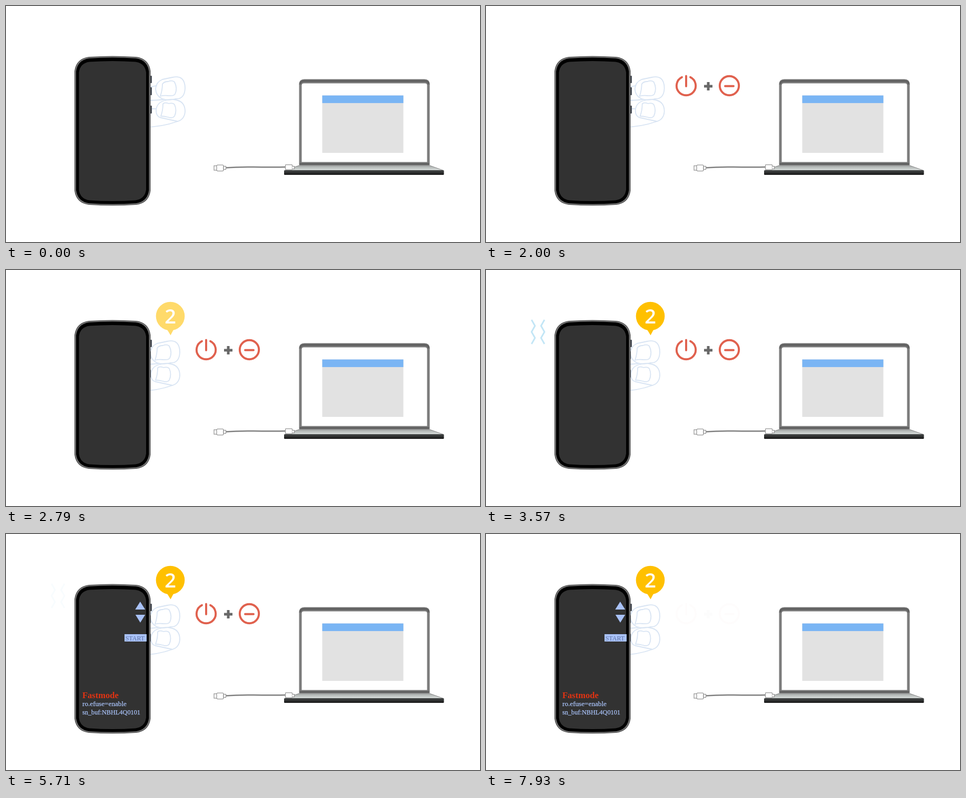
These frames come from a looping animation (900x450 px, 8000 ms). An HTML page:

```html
<!DOCTYPE html>
<html lang="en">
<head>
<meta charset="utf-8">
<title>Key combination with laptop</title>
<style>
  html, body { margin: 0; height: 100%; overflow: hidden; background: #fff; }
  svg { display: block; width: 900px; height: 450px; fill: none; }
  .serif { font-family: "Liberation Serif", serif; fill: #a9c2f8; }
  .body { stroke: #a9c2f8; stroke-width: 0.25; }
</style>
</head>
<body>
<svg viewBox="0 0 900 450">
  <defs>
    <linearGradient id="deck" x2="0" y2="1">
      <stop stop-color="#a4a8a7"/><stop offset="1" stop-color="#dbe0de"/>
    </linearGradient>
    <linearGradient id="base" x2="0" y2="1">
      <stop stop-color="#474a4a"/><stop offset="1" stop-color="#151515"/>
    </linearGradient>
  </defs>

  <g id="hand" stroke="#d8e4f3" stroke-width="1.8" stroke-linecap="round" stroke-linejoin="round">
    <path d="M262 160Q276 153 286 152M262 180Q290 180 300 178M262 196H285M262 231Q295 231 326 220"/>
    <path d="M284 158Q285 145 297 140L316 136Q340 131 340 157Q339 178 322 177Q308 181 297 177Q285 172 284 158Z"/>
    <path d="M297 149Q300 144 308 144Q316 141 320 145Q326 157 321 168Q318 172 308 171Q300 170 293 172Q297 160 297 149Z"/>
    <path d="M285 199Q286 184 302 180Q312 177 322 179Q340 182 340 201Q339 216 326 220L294 213Q285 211 285 199Z"/>
    <path d="M298 187Q300 183 309 186Q317 184 320 188Q325 199 320 210Q316 215 308 212Q300 210 294 210Q298 199 298 187Z"/>
  </g>

  <g fill="#4b5059">
    <rect x="272" y="133" width="5" height="14" rx="1"/>
    <g id="keys">
      <rect x="272" y="155" width="5" height="15" rx="1"/>
      <rect x="272" y="190" width="5" height="15" rx="1"/>
    </g>
  </g>
  <g id="phone"></g>

  <g id="menu" class="serif">
    <path d="M254.8 129L264.3 144H245.3ZM245.8 154H264.3L255 169Z"/>
    <rect x="225" y="191" width="42" height="14"/>
    <text x="226.7" y="202.7" font-size="12" style="fill:#5f74a8">START</text>
    <text x="145" y="313" font-size="16.5" font-weight="bold" style="fill:#e23312">Fastmode</text>
    <text class="body" x="145" y="328" font-size="13.2">ro.efuse=enable</text>
    <text class="body" x="145" y="344" font-size="12.3">sn_buf:NBHL4Q0101</text>
  </g>

  <path id="buzz" stroke="#2ba6de" stroke-width="3" stroke-linejoin="round"/>

  <g id="balloon">
    <path d="M305 112H319L312.5 124.5Z" fill="#ffc000"/>
    <circle cx="312" cy="88" r="27.3" fill="#ffc000"/>
    <text x="312" y="101.500" font-size="38" font-weight="600" text-anchor="middle" fill="#fff" font-family="Open Sans, sans-serif">2</text>
  </g>

  <g id="combo" stroke="#e0614e" stroke-width="3.9" stroke-linecap="round">
    <path d="M372 135.700A18.200 18.200 0 1 0 388 135.700M380 133.500V153"/>
    <circle cx="462" cy="152" r="18.200"/>
    <path d="M454 152.700H470"/>
    <path d="M414 153H430M422 145V161" stroke="#686868" stroke-width="5" stroke-linecap="butt"/>
  </g>

  <g transform="translate(.5 .6)">
    <path d="M556 303V149Q556 139 566 139H794Q804 139 804 149V303Z" fill="#7c7c7c"/>
    <path d="M558 149Q558 142.500 566 142.500H794Q802 142.500 802 149" stroke="#626262" stroke-width="4"/>
    <path d="M561 297V151Q561 147 565 147H795Q799 147 799 151V297Z" fill="#fff"/>
    <path d="M557 301H803" stroke="#606060" stroke-width="4"/>
    <path d="M556 303.500H804L830 313H529Z" fill="url(#deck)" stroke="#8a8a8a"/>
    <rect x="527.500" y="312.500" width="303.500" height="9" rx="1.500" fill="url(#base)"/>
    <rect x="600" y="170" width="154" height="109.500" fill="#e2e2e2"/>
    <rect x="600" y="170" width="154" height="14.500" fill="#7ab5f4"/>

    <path d="M416 308Q440 306 470 306.500T531 306.500" stroke="#808080" stroke-width="2.500"/>
    <g fill="#fff" stroke="#999" stroke-width="1.300">
      <rect x="394.500" y="304" width="6" height="8.500"/>
      <rect x="399.500" y="302.500" width="13" height="11.500" rx="2"/>
      <rect x="412.500" y="305" width="4.500" height="6"/>
      <rect x="530" y="302" width="13" height="9.500" rx="1"/>
      <path d="M543 305H547V310H543"/>
    </g>
  </g>
</svg>
<script>
const LOOP = 8000;
const el = id => document.getElementById(id);
const ramp = (t, from, to) => Math.min(1, Math.max(0, (t - from) / (to - from)));
const fade = (id, value) => el(id).setAttribute("opacity", value);
const shift = (id, x) => el(id).setAttribute("transform", `translate(${x} 0)`);

// Rounded slab whose top and bottom edges bulge slightly.
function slab(x1, y1, x2, y2, r, fill) {
  const mid = (x1 + x2) / 2, k = r * 0.12;
  return `<path fill="${fill}" d="M${x1} ${y1 + r}Q${x1 + k} ${y1 + k} ${x1 + r} ${y1}
    Q${mid} ${y1 - 3} ${x2 - r} ${y1}Q${x2 - k} ${y1 + k} ${x2} ${y1 + r}
    V${y2 - r}Q${x2 - k} ${y2 - k} ${x2 - r} ${y2}
    Q${mid} ${y2 + 3} ${x1 + r} ${y2}Q${x1 + k} ${y2 - k} ${x1} ${y2 - r}Z"/>`;
}
el("phone").innerHTML =
  slab(130, 97, 274.5, 379, 27, "#4a4a4a") +
  slab(131.2, 98.2, 273.3, 377.8, 26, "#7c7c7c") +
  slab(133, 99.7, 271.5, 376.3, 25, "#000") +
  slab(138.5, 106.5, 266, 370.5, 20, "#323232");

const zigzag = (a, b) =>
  "M" + Array.from({ length: 5 }, (_, i) => `${i % 2 ? b : a} ${95 + i * 11.5}`).join("L");
el("buzz").setAttribute("d", zigzag(86.5, 93) + zigzag(111, 104.5));

function draw(now) {
  const t = now % LOOP;
  fade("combo", ramp(t, 200, 1750) - ramp(t, 6350, 7950));
  shift("hand", -10 * ramp(t, 1900, 2640));
  shift("keys", -2 * ramp(t, 2250, 2600));
  fade("balloon", ramp(t, 2600, 2930));
  fade("buzz", ramp(t, 3260, 4360) - ramp(t, 4500, 5750));
  fade("menu", ramp(t, 3600, 3950));
  requestAnimationFrame(draw);
}
draw(performance.now());
</script>
</body>
</html>
```
